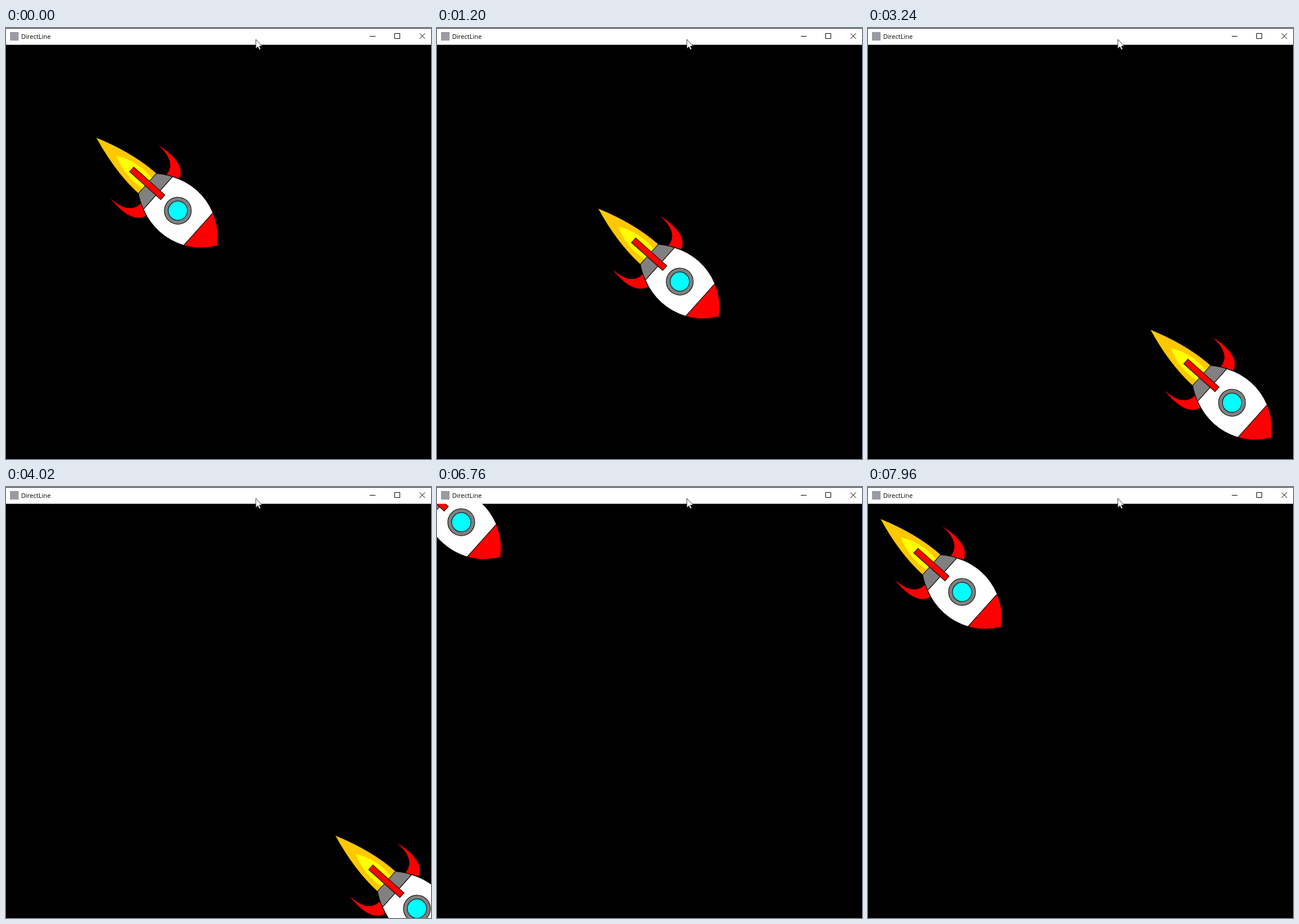
Recreate the animation shown at these times as an HTML page. Size 743x754 px, loop 8000 ms.

```html
<!DOCTYPE html>
<html lang="en">
<head>
<meta charset="utf-8">
<title>DirectLine</title>
<style>
  html, body { margin: 0; width: 100%; height: 100%; overflow: hidden; background: #000; }
  svg { display: block; }
  text { font: 11px "Open Sans", "Noto Sans", sans-serif; }
</style>
</head>
<body>
<svg width="743" height="754" viewBox="0 0 743 754">
  <defs>
    <path id="fin" fill="#f00" d="M89 -62.5Q146 -72 155.5 -44L134.5 -34Q133 -62.5 89 -62.5Z"/>
  </defs>
  <rect width="743" height="754"/>

  <g id="rocket">
    <!-- Local x axis runs from the flame tip to the nose -->
    <g transform="translate(158 192) rotate(41.85)">
      <path fill="#ffc800" d="M0 0Q65 -23 119.7 -23.4V23.4Q65 23 0 0Z"/>
      <path fill="#ff0" d="M47.5 0Q80 -18 119.7 -12V12Q80 18 47.5 0Z"/>
      <use href="#fin"/>
      <use href="#fin" transform="scale(1 -1)"/>
      <g stroke="#000">
        <path fill="#808080" d="M119.7 -23.4A109.6 109.6 0 0 1 144.8 -38.2V38.2A109.6 109.6 0 0 1 119.7 23.4Z"/>
        <path fill="#fff" d="M144.8 -38.2A109.6 109.6 0 0 1 239.4 -38.2V38.2A109.6 109.6 0 0 1 144.8 38.2Z"/>
        <path fill="#f00" d="M239.4 -38.2A109.6 109.6 0 0 1 283.3 0A109.6 109.6 0 0 1 239.4 38.2Z"/>
        <circle cx="191.2" r="23.6" fill="#808080"/>
        <circle cx="191.2" r="16.8" fill="#0ff"/>
        <rect x="82.8" y="-5.5" width="73.2" height="11" fill="#f00"/>
      </g>
    </g>
  </g>

  <rect width="743" height="29.4" fill="#fff"/>
  <rect width="743" height="1" fill="#181818"/>
  <rect x="7" y="7" width="15" height="15" fill="#9a9ca4"/>
  <text x="26.5" y="19">DirectLine</text>
  <g fill="none" stroke="#000">
    <path d="M636 14.5H646M679.5 9.5H688.5V18.5H679.5Z"/>
    <path d="M723 9.5L732.5 19M732.5 9.5L723 19"/>
  </g>
  <path d="M436.8 20V36L440.3 32.7L442.9 38L445.3 36.9L442.9 31.7H447.8Z" fill="#fff" stroke="#222" stroke-width=".9"/>
</svg>
<script>
  const LOOP = 8000, TICK = 20, WRAP = 5640;
  const rocket = document.getElementById('rocket');

  // Diagonal offset in 2 px steps; after leaving, the rocket re-enters at top left.
  function offsetAt(time) {
    const travel = time < WRAP ? time * 0.1038 : -136 + (time - 7960) * 0.10245;
    return 2 * Math.round(travel / 2);
  }

  function draw() {
    const time = Math.floor(performance.now() % LOOP / TICK) * TICK;
    const offset = offsetAt(time);
    rocket.setAttribute('transform', `translate(${offset} ${offset})`);
    requestAnimationFrame(draw);
  }
  draw();
</script>
</body>
</html>
```
